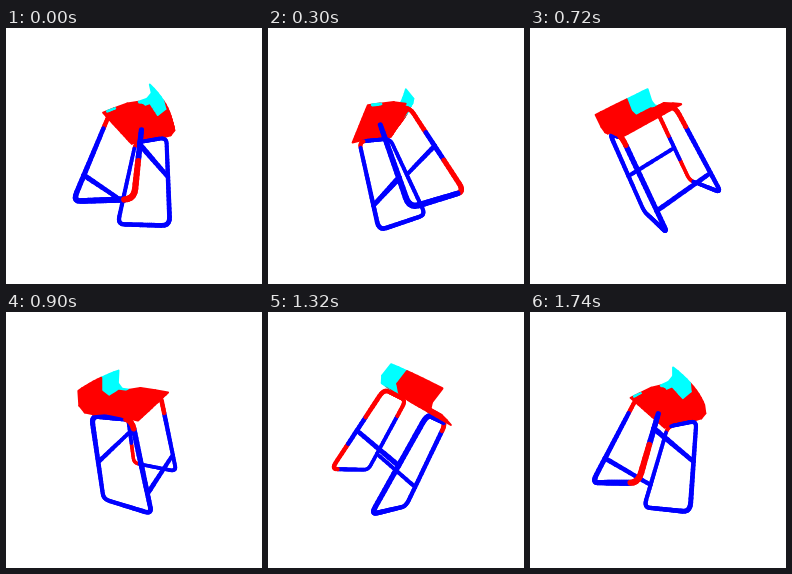
An HTML page with a canvas for the animation above (1.8 s loop, 256 px wide and 256 px high).

```html
<!DOCTYPE html>
<html lang="en">
<head>
<meta charset="utf-8">
<title>Turning stool</title>
<style>
html, body { margin: 0; width: 100%; height: 100%; overflow: hidden; background: #fff; }
canvas { display: block; width: 256px; height: 256px; }
</style>
</head>
<body>
<canvas id="stage" width="256" height="256"></canvas>
<script>
const ctx = document.getElementById('stage').getContext('2d');
const RED = '#f00', BLUE = '#00f', CYAN = '#0ff';
const STEPS = 30, STEP_MS = 60, CAMERA = 220, LEG_TOP = 97;

// Stool axes in world space: depth (front to back), width and up.
const ORIGIN = [-8.5, 50.5, 29];
const DEPTH = [.873, -.122, .471];
const WIDTH = [.484, .499, -.718];
const UP = [.147, -.856, -.495];

const mix = (p, q, t) => p.map((v, i) => v + (q[i] - v) * t);
const mean = pts => pts[0].map((_, i) => pts.reduce((s, p) => s + p[i], 0) / pts.length);
const leg = (a, b, t) => [a * (28.6 - 8.6 * t), b * (34 - 6 * t), LEG_TOP * t];

function tubeColor([a, b, h]) {
  const t = h / LEG_TOP;
  const red = b < 0
    ? t > .8 || (a > 20 && (t < .34 || t > .65))
    : a < -14 && t > .92;
  return red ? RED : BLUE;
}

// Closed leg frame with rounded corners.
function frame(side) {
  const corners = [leg(-1, side, 0), leg(1, side, 0), leg(1, side, 1), leg(-1, side, 1)];
  const toward = (p, q) => mix(p, q, 8 / Math.hypot(...p.map((v, i) => v - q[i])));
  const pts = [];
  corners.forEach((p, i) => {
    const next = corners[(i + 1) % 4];
    const from = toward(p, corners[(i + 3) % 4]), to = toward(p, next);
    for (let j = 0; j < 5; j++) pts.push(mix(mix(from, p, j / 5), mix(p, to, j / 5), j / 5));
    const end = toward(next, p);
    for (let j = 0; j < 20; j++) pts.push(mix(to, end, j / 20));
  });
  return pts.map((p, i) => [p, pts[(i + 1) % pts.length]]);
}

function rest(a, t) {
  const from = leg(a, -1, t), to = leg(a, 1, t);
  return Array.from({ length: 10 }, (_, i) => [mix(from, to, i / 10), mix(from, to, (i + 1) / 10)]);
}

const tubes = [
  ...[...frame(-1), ...frame(1)].map(pts => ({ pts, color: tubeColor(mean(pts)) })),
  ...[...rest(-1, .25), ...rest(1, .5)].map(pts => ({ pts, color: BLUE }))
];

// Side profile of seat and backrest, swept across the width.
const profile = [[-27, 98], [-14, 100], [2, 102], [15, 100], [24, 101], [28, 107], [24.4, 120]];
const COLS = 10;
const shell = [];
function shellPoint(i, j) {
  const [a, h] = profile[i], u = 2 * j / COLS - 1;
  return [a + (i > 4 ? 4 * (1 - u * u) : 0), 30.5 * u, h];
}
for (let i = 0; i < profile.length - 1; i++) {
  for (let j = 0; j < COLS; j++) {
    const cyan = i > 3 ? j < 4 : i === 3 && j < 1;
    shell.push({
      pts: [shellPoint(i, j), shellPoint(i + 1, j), shellPoint(i + 1, j + 1), shellPoint(i, j + 1)],
      color: cyan ? CYAN : RED
    });
  }
}
const edgePatch = { pts: [[-22, -30, 99], [-13, -30, 100]], color: CYAN };

function draw(angle) {
  const c = Math.cos(angle), s = Math.sin(angle);
  const turn = ([x, y, z]) => [x * c + z * s, y, z * c - x * s];
  const place = ([a, b, h]) =>
    turn(ORIGIN.map((o, i) => o + a * DEPTH[i] + b * WIDTH[i] + h * UP[i]));
  const project = p => {
    const [x, y, z] = place(p), k = CAMERA / (CAMERA - z);
    return [128 + k * x, 128 + k * y, k];
  };

  function paint(parts, width) {
    parts
      .map(({ pts, color }) => ({ pts: pts.map(project), color, z: place(mean(pts))[2] }))
      .sort((p, q) => p.z - q.z)
      .forEach(({ pts, color }) => {
        ctx.beginPath();
        pts.forEach(([x, y]) => ctx.lineTo(x, y));
        ctx.fillStyle = ctx.strokeStyle = color;
        ctx.lineWidth = width * pts[0][2];
        if (pts.length > 2) {
          ctx.closePath();
          ctx.fill();
        }
        ctx.stroke();
      });
  }

  ctx.fillStyle = '#fff';
  ctx.fillRect(0, 0, 256, 256);
  ctx.lineCap = ctx.lineJoin = 'round';

  const eye = [0, 0, CAMERA], center = place([0, 0, 98]);
  const fromAbove = turn(UP).reduce((sum, n, i) => sum + n * (eye[i] - center[i]), 0) > 0;
  if (fromAbove) paint(tubes, 4.5);
  paint(shell, 2);
  if (!fromAbove) {
    paint([edgePatch], 3);
    paint(tubes, 4.5);
  }
}

const start = performance.now();
function tick() {
  const step = Math.floor((performance.now() - start) / STEP_MS) % STEPS;
  draw(step * 2 * Math.PI / STEPS);
  requestAnimationFrame(tick);
}
tick();
</script>
</body>
</html>
```
